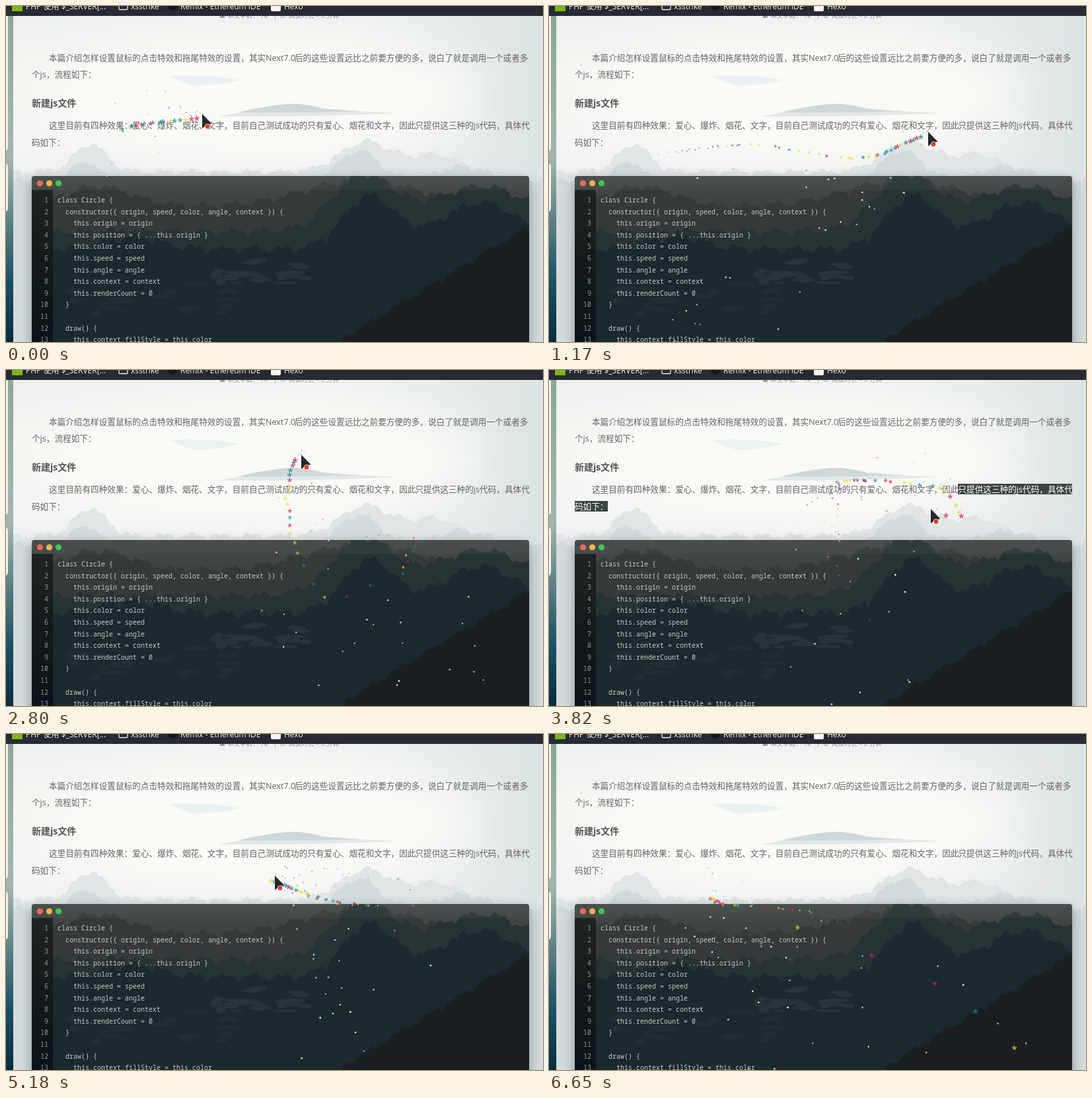
Animation of 813x508 px, one loop 6750 ms. Source, as an HTML page with a canvas:

```html
<!DOCTYPE html>
<html lang="zh-CN">
<head>
<meta charset="utf-8">
<style>
  html, body { margin: 0; width: 813px; height: 508px; overflow: hidden; }
  svg, canvas { position: absolute; left: 0; top: 0; }
  text { font: 12.63px "Open Sans", "Noto Sans CJK SC", "Noto Sans CJK", sans-serif; fill: #646566; white-space: pre; }
  .bar text { font-size: 12px; fill: #f1f2f4; }
  .meta text { font-size: 9.6px; fill: #9a9c9c; }
  .code text { font: 10px "Noto Sans Mono", "DejaVu Sans Mono", monospace; fill: #c5c8c6; }
  .code .num { fill: #8d9393; text-anchor: end; }
  #selText text { fill: #fff; }
  #selCode text { fill: #e6e8e8; }
</style>
</head>
<body>
<svg width="813" height="508">
  <defs>
    <linearGradient id="strip" x2="0" y2="1">
      <stop offset="0" stop-color="#8ca598"/><stop offset=".45" stop-color="#a5b6ae"/>
      <stop offset=".65" stop-color="#5b7d80"/><stop offset=".82" stop-color="#1b5163"/><stop offset="1" stop-color="#0a2d3b"/>
    </linearGradient>
    <linearGradient id="sky" x2="0" y2="1">
      <stop offset="0" stop-color="#ebefec"/><stop offset=".2" stop-color="#f5f6f3"/>
      <stop offset=".42" stop-color="#f5f6f4"/><stop offset="1" stop-color="#cad3d6"/>
    </linearGradient>
    <linearGradient id="side">
      <stop offset=".6" stop-color="#e3e9e8" stop-opacity="0"/><stop offset="1" stop-color="#dbe3e3"/>
    </linearGradient>
    <linearGradient id="night" x2="0" y2="1">
      <stop offset="0" stop-color="#474b4a"/><stop offset=".35" stop-color="#333938"/><stop offset="1" stop-color="#1a282d"/>
    </linearGradient>
    <linearGradient id="gutter" x2="0" y2="1">
      <stop offset="0" stop-color="#1d201d"/><stop offset="1" stop-color="#091116"/>
    </linearGradient>
    <filter id="soft" x="-20%" y="-30%" width="140%" height="160%"><feGaussianBlur stdDeviation="9"/></filter>
    <filter id="haze" x="-30%" y="-50%" width="160%" height="200%"><feGaussianBlur stdDeviation="35"/></filter>
    <clipPath id="box"><path d="M39 508V261q0-4 4-4H788q4 0 4 4V508z"/></clipPath>
    <clipPath id="panel"><path d="M11 0H813V508H11z"/></clipPath>
  </defs>

  <rect width="813" height="508" fill="url(#strip)"/>
  <g fill="#eef1ef"><rect x="-12" y="10" width="15" height="210" rx="6"/><rect x="-12" y="237" width="15" height="75" rx="6"/></g>
  <g clip-path="url(#panel)">
    <rect x="11" width="802" height="508" fill="url(#sky)"/>
    <rect x="11" width="802" height="508" fill="url(#side)"/>
    <ellipse cx="390" cy="135" rx="330" ry="95" fill="#fafaf7" filter="url(#haze)"/>
    <path d="M248 106q50-4 106 6-40 10-72 8-20-6-34-14z" fill="#ebf2f2"/>
    <path d="M322 167q42-7 70-14 26-6 50-5 24 2 40 7 50 4 110 7-130 6-270 5z" fill="#e2e8e8"/>
    <path d="M352 161q44-12 88-13 24 2 36 7 30 3 60 4-90 3-184 2z" fill="#cfd8d9"/>
    <g id="lightClouds"></g>
    <rect x="39" y="263" width="753" height="270" fill="#24343c" opacity=".42" filter="url(#soft)"/>
  </g>

  <g clip-path="url(#box)">
    <rect x="39" y="257" width="753" height="251" fill="url(#night)"/>
    <g id="darkClouds"></g>
    <rect x="39" y="257" width="753" height="21" fill="#555a59" opacity=".22"/>
    <rect x="39" y="278" width="32" height="230" fill="url(#gutter)" opacity=".93"/>
  </g>
  <circle cx="51.5" cy="268" r="4.6" fill="#ec6a5f"/>
  <circle cx="65.5" cy="268" r="4.6" fill="#e9b851"/>
  <circle cx="79.5" cy="268" r="4.6" fill="#42c65a"/>
  <g class="code" id="code"></g>
  <g class="code" id="selCode">
    <rect x="78" y="304" width="342" height="14" fill="#555d5e"/>
    <text x="90" y="315">constructor({ origin, speed, color, angle, context }) {</text>
  </g>
  <path id="copy" d="M778 264h2.5v-1.5h3v1.5h2.5v8.5h-8z" fill="#dcdfdf"/>

  <text x="65" y="82.5">本篇介绍怎样设置鼠标的点击特效和拖尾特效的设置，其实</text>
  <text x="393" y="82.5">Next7.0</text>
  <text x="437" y="82.5">后的这些设置远比之前要方便的多，说白了就是调用一个或者多</text>
  <text x="39" y="107.5">个js，流程如下：</text>
  <text x="39" y="152" style="font-size:14px;font-weight:700;fill:#555">新建js文件</text>
  <text x="65" y="184.5">这里目前有四种效果：爱心、爆炸、烟花、文字，目前自己测试成功的只有爱心、烟花和文字，因此</text>
  <text x="619.5" y="184.5">只提供这三种的js代码，具体代</text>
  <text x="39" y="210.5">码如下：</text>
  <g id="selText">
    <path d="M619 172h173v16h-173zM39 198h50v16h-50z" fill="#3b4543"/>
    <text x="619.5" y="184.5">只提供这三种的js代码，具体代</text>
    <text x="39" y="210.5">码如下：</text>
  </g>

  <g class="meta">
    <rect x="324" y="10" width="7" height="8" fill="#9a9c9c"/>
    <text x="335" y="17.5">本文字数： 7k</text><text x="405" y="17.5">|</text>
    <circle cx="419" cy="14" r="3.5" fill="none" stroke="#9a9c9c"/>
    <text x="428" y="17.5">阅读时长 ≈ 6 分钟</text>
  </g>
  <g class="bar">
    <rect width="813" height="15" fill="#272a32"/>
    <rect x="9" y="-8" width="16" height="16" fill="#7cb518"/>
    <text x="30" y="5">PHP 使用 $_SERVER[...</text>
    <path d="M171-6v10.5q0 1 1 1h11q1 0 1-1V-6" fill="none" stroke="#e8e9eb" stroke-width="1.3"/>
    <text x="189" y="5">xsstrike</text>
    <circle cx="252" cy="0" r="7" fill="#14161b"/>
    <text x="264" y="5">Remix - Ethereum IDE</text>
    <rect x="401" y="-8" width="15" height="16" rx="2" fill="#f4f4f4"/>
    <text x="421" y="5">Hexo</text>
  </g>
</svg>
<canvas id="fx" width="813" height="508"></canvas>

<script>
const $ = id => document.getElementById(id);
const random = (i, salt) => { const v = Math.sin(i * 12.9898 + salt * 78.233) * 43758.5453; return v - Math.floor(v); };
const hump = (x, center, width) => Math.exp(-(((x - center) / width) ** 2));

// Billowing cloud bank below crest(x), filled down to the bottom edge
function cloudBank(group, fill, rough, crest, left = 11) {
  let d = `M${left} 508`;
  for (let x = left; x <= 813; x += 3) {
    const bump = Math.abs(Math.sin(x * .07 + rough)) + .6 * Math.abs(Math.sin(x * .19 + crest(0)));
    d += `L${x} ${Math.round(crest(x) - rough * bump + 3 * random(x, rough))}`;
  }
  $(group).innerHTML += `<path d="${d}V508z" fill="${fill}"/>`;
}

// Loose wisps of smoke scattered over a box
function wisps(group, fill, cx, cy, width, height) {
  for (let i = 0; i < 22; i++) {
    const x = cx + (random(i, cx) - .5) * width, y = cy + (random(i, cy) - .5) * height;
    $(group).innerHTML += `<ellipse cx="${x}" cy="${y}" rx="${6 + 14 * random(i, 8)}" ry="${2 + 4 * random(i, 9)}" fill="${fill}"/>`;
  }
}

cloudBank('lightClouds', '#e0e6e6', 7, x => 256 - 42 * hump(x, 128, 34) - 46 * hump(x, 545, 55) - 26 * hump(x, 650, 50));
cloudBank('lightClouds', '#d3dbdd', 7, x => 268 - 28 * hump(x, 120, 26) - 44 * hump(x, 535, 42) - 20 * hump(x, 690, 50));
cloudBank('darkClouds', '#343a3a', 9, x => 310 - 30 * hump(x, 140, 70) - 40 * hump(x, 540, 120));
cloudBank('darkClouds', '#273235', 9, x => 348 - 82 * hump(x, 540, 65) - 68 * hump(x, 720, 110));
cloudBank('darkClouds', '#1b282c', 10, x => 376 - 80 * hump(x, 550, 55) - 70 * hump(x, 720, 90) - 18 * hump(x, 190, 60));
wisps('darkClouds', '#273336', 390, 402, 150, 36);
wisps('darkClouds', '#202d31', 220, 440, 260, 50);
cloudBank('darkClouds', '#1a1e21', 7, x => 508 - .6 * (x - 510), 510);

$('code').innerHTML = `class Circle {
  constructor({ origin, speed, color, angle, context }) {
    this.origin = origin
    this.position = { ...this.origin }
    this.color = color
    this.speed = speed
    this.angle = angle
    this.context = context
    this.renderCount = 0
  }

  draw() {
    this.context.fillStyle = this.color`.split('\n').map((line, i) => {
  const y = Math.round(297 + 17.6 * i);
  return `<text class="num" x="64" y="${y}">${i + 1}</text><text x="78" y="${y}">${line}</text>`;
}).join('');

const LOOP = 6750, STEP = 133, START = -800;
const STAR_LIFE = 2.3, DOT_LIFE = 1.7;
const STAR_COLORS = ['#D61C59', '#E7D84B', '#1B8798'];

// Turning points of the pointer: [ms, x, y]
const turns = [
  [START, 185, 156], [0, 297, 163], [630, 490, 203], [1197, 574, 190], [1620, 631, 216],
  [1880, 604, 268], [2000, 496, 313], [2128, 452, 252], [2420, 433, 178], [2793, 447, 128],
  [3200, 485, 138], [3600, 604, 165], [3790, 632, 212], [3857, 578, 210], [4400, 498, 220],
  [5187, 407, 214], [5650, 350, 222], [5900, 272, 225], [6300, 255, 230], [6480, 610, 375], [6660, 800, 560]
];

// Smooth path through the turning points that never overshoots them
function pointerAt(t) {
  const last = turns.length - 1;
  const n = Math.max(1, turns.findIndex((p, i) => p[0] > t || i === last));
  const a = turns[n - 1], b = turns[n], span = b[0] - a[0];
  const k = Math.min(1, Math.max(0, (t - a[0]) / span));
  return [1, 2].map(c => {
    const rate = i => (turns[i + 1][c] - turns[i][c]) / (turns[i + 1][0] - turns[i][0]);
    const slope = i => {
      if (i === 0 || i === last) return 0;
      const p = rate(i - 1), q = rate(i);
      return p * q > 0 ? 2 * p * q / (p + q) : 0;
    };
    return a[c] + (b[c] - a[c]) * k * k * (3 - 2 * k)
      + span * k * (1 - k) * (slope(n - 1) * (1 - k) - slope(n) * k);
  });
}

const ctx = $('fx').getContext('2d');
const pointerShape = new Path2D('M0 0V22L6 17L14.5 15z');

// Calls draw(index, age, x, y) for each living particle shed while the pointer moved
function trail(t, interval, life, draw) {
  const oldest = Math.max(START, t - life * 1000);
  for (let i = Math.ceil(oldest / interval); i * interval <= t; i++) {
    const [x, y] = pointerAt(i * interval), [px, py] = pointerAt((i - 1) * interval);
    if (Math.hypot(x - px, y - py) > .4) draw(i, (t - i * interval) / 1000, x, y);
  }
}

function drawStar(i, age, x, y) {
  const size = 16 * (1 - age / STAR_LIFE);
  if (size < 1) return;
  ctx.font = `${size}px "Open Sans", sans-serif`;
  ctx.fillStyle = STAR_COLORS[Math.floor(random(i, 1) * 3)];
  ctx.fillText('*', x - 8 + (random(i, 2) - .5) * 20 * age, y + 7 + 33 * age + size * .53);
}

function drawDot(i, age, x, y) {
  ctx.fillStyle = `hsl(${random(i, 3) * 360} 60% ${72 + 14 * random(i, 4)}%)`;
  ctx.beginPath();
  ctx.arc(x + (random(i, 5) - .5) * 200 * age,
    y + (random(i, 6) * 200 - 160) * age + 210 * age * age, 1 + .5 * random(i, 7), 0, 7);
  ctx.fill();
}

function drawPointer(x, y) {
  ctx.save();
  ctx.translate(x, y);
  ctx.fillStyle = '#222a2d';
  ctx.strokeStyle = '#fff';
  ctx.lineWidth = 1.2;
  ctx.stroke(pointerShape);
  ctx.fill(pointerShape);
  ctx.beginPath();
  ctx.arc(8, 19, 3.4, 0, 7);
  ctx.fillStyle = '#d8432c';
  ctx.stroke();
  ctx.fill();
  ctx.restore();
}

function show(id, visible) { $(id).style.visibility = visible ? 'visible' : 'hidden'; }

function render(now) {
  // The picture advances in even steps, each appearing slightly early
  const t = Math.min(50, Math.floor((now % LOOP + 40) / STEP)) * STEP;
  const within = (from, to) => t >= from && t < to;
  show('selCode', within(1990, 2390));
  show('selText', within(3700, 3970));
  show('copy', within(1860, 2390) || within(5850, 6110) || within(6380, 6510));
  ctx.clearRect(0, 0, 813, 508);
  ctx.textAlign = 'center';
  trail(t, 34, DOT_LIFE, drawDot);
  trail(t, 42, STAR_LIFE, drawStar);
  drawPointer(...pointerAt(t));
  requestAnimationFrame(render);
}
requestAnimationFrame(render);
</script>
</body>
</html>
```
